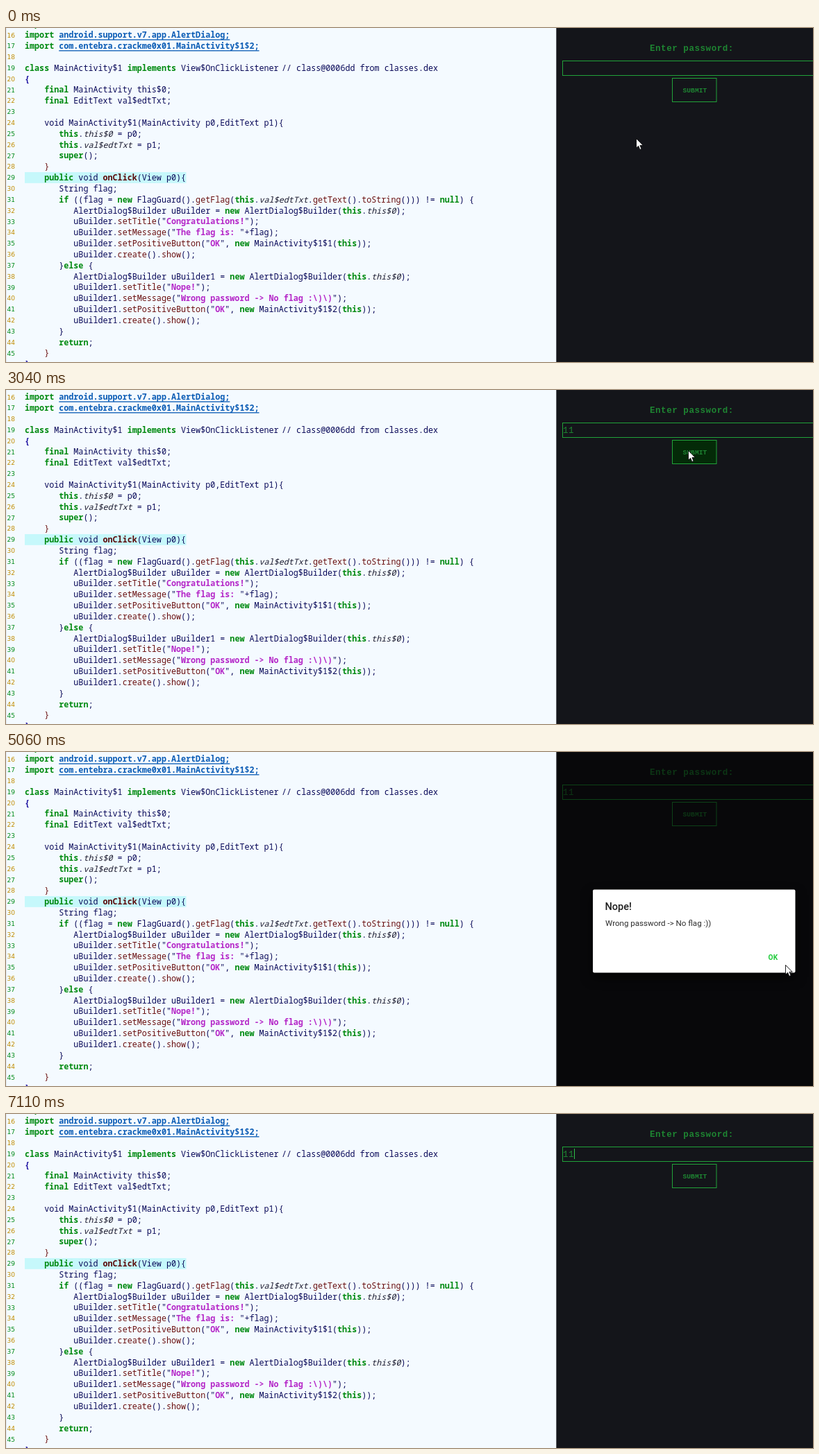
Write an HTML page with a canvas that moves like this. It is 1162 by 482 pixels and loops after 8 s.

```html
<!DOCTYPE html>
<html lang="en">
<head>
<meta charset="utf-8">
<title>Password check</title>
<style>
html, body { margin: 0; width: 100%; height: 100%; overflow: hidden; background: #14151a; }
canvas { display: block; }
</style>
</head>
<body>
<canvas id="stage" width="1162" height="482"></canvas>
<script>
const ctx = document.getElementById('stage').getContext('2d');
const W = 1162, H = 482, SPLIT = 792.5, LOOP = 8000;
const CODE_X = 27, CHAR = 7.032, ROW = 15.83, FIRST = 16, BASE = 14.3;
const MONO = '"Noto Sans Mono", "DejaVu Sans Mono", monospace';
const TYPED = '"Liberation Mono", monospace';
const UI = 'Roboto, sans-serif';
const LINE = '#21a239', INK = '#1e8632';

// ~ starts a run of text, the letter after it picks the style
const styles = {
  n: ['500 ', '#080858'],
  k: ['bold ', '#008a10'],
  m: ['500 ', '#6a1010'],
  d: ['bold ', '#5a0808'],
  s: ['bold ', '#b427c8'],
  i: ['italic 500 ', '#1c1c30'],
  b: ['bold ', '#1c10a0'],
  u: ['bold ', '#0b5cb5']
};
const code = String.raw`~kimport ~uandroid.support.v7.app.AlertDialog;
~kimport ~ucom.entebra.crackme0x01.MainActivity$1$2;

~kclass ~nMainActivity$1 ~kimplements ~nView$OnClickListener
~b{
~n    ~kfinal ~nMainActivity this$0;
~n    ~kfinal ~nEditText val$edtTxt;

~n    void MainActivity$1(MainActivity p0,EditText p1){
~n       ~kthis~n.~ithis$0~n = p0;
~n       ~kthis~n.~ival$edtTxt~n = p1;
~n       ~ksuper~n();
~m    }
~n    ~kpublic ~nvoid ~donClick~n(View p0){
~n       String flag;
~n       ~kif ~n((flag = ~knew ~nFlagGuard().~mgetFlag~n(~kthis~n.~ival$edtTxt~n.~mgetText~n().~mtoString~n())) != ~knull~n) {
~n          AlertDialog$Builder uBuilder = ~knew ~nAlertDialog$Builder(~kthis~n.~ithis$0~n);
~n          uBuilder.~msetTitle~n("~sCongratulations!~n");
~n          uBuilder.~msetMessage~n("~sThe flag is: ~n"+flag);
~n          uBuilder.~msetPositiveButton~n("~sOK~n", ~knew ~nMainActivity$1$1(~kthis~n));
~n          uBuilder.~mcreate~n().~mshow~n();
~n       }~kelse ~n{
~n          AlertDialog$Builder uBuilder1 = ~knew ~nAlertDialog$Builder(~kthis~n.~ithis$0~n);
~n          uBuilder1.~msetTitle~n("~sNope!~n");
~n          uBuilder1.~msetMessage~n("~sWrong password -> No flag :\)\)~n");
~n          uBuilder1.~msetPositiveButton~n("~sOK~n", ~knew ~nMainActivity$1$2(~kthis~n));
~n          uBuilder1.~mcreate~n().~mshow~n();
~n       }
~n       ~kreturn~n;
~m    }
~b}`.split('\n');

// Each step holds until the next one begins
const steps = [
  { at: 0, cursor: [907, 159] },
  { at: 1030, cursor: [875, 60] },
  { at: 2030, cursor: [875, 60], typed: '11', caret: true },
  { at: 3040, cursor: [982, 87], typed: '11', pressed: true },
  { at: 4060, cursor: [876, 275], typed: '11', dim: 0.6, dialog: true },
  { at: 5060, cursor: [1122, 307], typed: '11', dim: 0.6, dialog: true },
  { at: 6080, cursor: [1105, 293], typed: '11', dim: 0.4 },
  { at: 7110, typed: '11', caret: true }
];

function rect(x, y, w, h, color) {
  ctx.fillStyle = color;
  ctx.fillRect(x, y, w, h);
}

function frame(x, y, w, h, color) {
  ctx.strokeStyle = color;
  ctx.lineWidth = 1;
  ctx.strokeRect(x + 0.5, y + 0.5, w, h);
}

function text(str, x, y, font, color, spacing = 0) {
  ctx.font = font;
  ctx.letterSpacing = spacing + 'px';
  ctx.fillStyle = color;
  ctx.fillText(str, x, y);
}

function codeRun(str, style, x, y) {
  const [face, color] = styles[style];
  text(str, x, y, `${face}11.72px ${MONO}`, color);
  if (style === 'u') rect(x, y + 2, str.length * CHAR, 1.3, color);
}

function drawCode() {
  rect(0, 0, SPLIT, H, '#f4faff');
  rect(0, 0, 1, H, '#e3e8ee');
  rect(CODE_X, 208, 232.5, ROW, '#c6f8fb');
  codeRun('import', 'k', CODE_X, BASE - ROW);
  code.forEach((line, row) => {
    const n = FIRST + row, y = BASE + row * ROW;
    if (n < 46) text(n, 1.5, y - 0.8, '9px "DejaVu Sans", sans-serif', n % 2 ? '#008a18' : '#c08c00');
    let col = 0;
    for (const run of line.split('~').slice(1)) {
      const str = run.slice(1);
      codeRun(str, run[0], CODE_X + col * CHAR, y);
      col += str.length;
    }
  });
  codeRun('// class@0006dd from classes.dex', 'n', 397, BASE + 3 * ROW);
}

function drawForm(s) {
  rect(SPLIT, 0, W - SPLIT, H, '#14151a');
  text('Enter password:', 927, 32.5, `bold 12.5px ${TYPED}`, INK, 0.56);
  frame(801, 47, 380, 21, LINE);
  if (s.typed) text(s.typed, 802, 62, `12.5px ${TYPED}`, INK, 0.5);
  if (s.caret) rect(818, 50, 1, 15, '#2fc04a');
  if (s.pressed) rect(959, 72, 64, 35, '#042a08');
  frame(959, 72, 63.5, 34, LINE);
  text('SUBMIT', 974.5, 93, `bold 9.5px ${TYPED}`, INK, 0.1);
  if (s.dim) rect(794, 0, W - 794, H, `rgba(0,0,0,${s.dim})`);
}

function drawDialog() {
  ctx.save();
  ctx.shadowColor = 'rgba(0,0,0,0.7)';
  ctx.shadowBlur = 16;
  ctx.shadowOffsetY = 7;
  ctx.fillStyle = '#fff';
  ctx.beginPath();
  ctx.roundRect(845, 198.5, 291.5, 120, 2);
  ctx.fill();
  ctx.restore();
  text('Nope!', 862.5, 228, `500 14.5px ${UI}`, '#1e1e1e');
  text('Wrong password -> No flag :))', 863, 250.5, `11.57px ${UI}`, '#2c2c2c');
  text('OK', 1097.5, 299.5, `bold 10.2px ${UI}`, '#1fcb3a', 0.3);
}

function drawCursor([x, y]) {
  ctx.save();
  ctx.translate(x + 0.5, y + 0.5);
  ctx.beginPath();
  [[0, 0], [0, 13.6], [3.1, 10.8], [5.3, 16], [7.6, 15], [5.4, 10], [9.7, 9.8]]
    .forEach(p => ctx.lineTo(...p));
  ctx.closePath();
  ctx.fillStyle = '#fff';
  ctx.fill();
  ctx.strokeStyle = '#0a0a0c';
  ctx.lineWidth = 0.9;
  ctx.stroke();
  ctx.restore();
}

function draw(now) {
  const t = now % LOOP;
  const s = steps.filter(step => step.at <= t).pop();
  drawCode();
  drawForm(s);
  if (s.dialog) drawDialog();
  if (s.cursor) drawCursor(s.cursor);
}

const start = performance.now();
function tick() {
  draw(performance.now() - start);
  requestAnimationFrame(tick);
}
tick();
</script>
</body>
</html>
```
